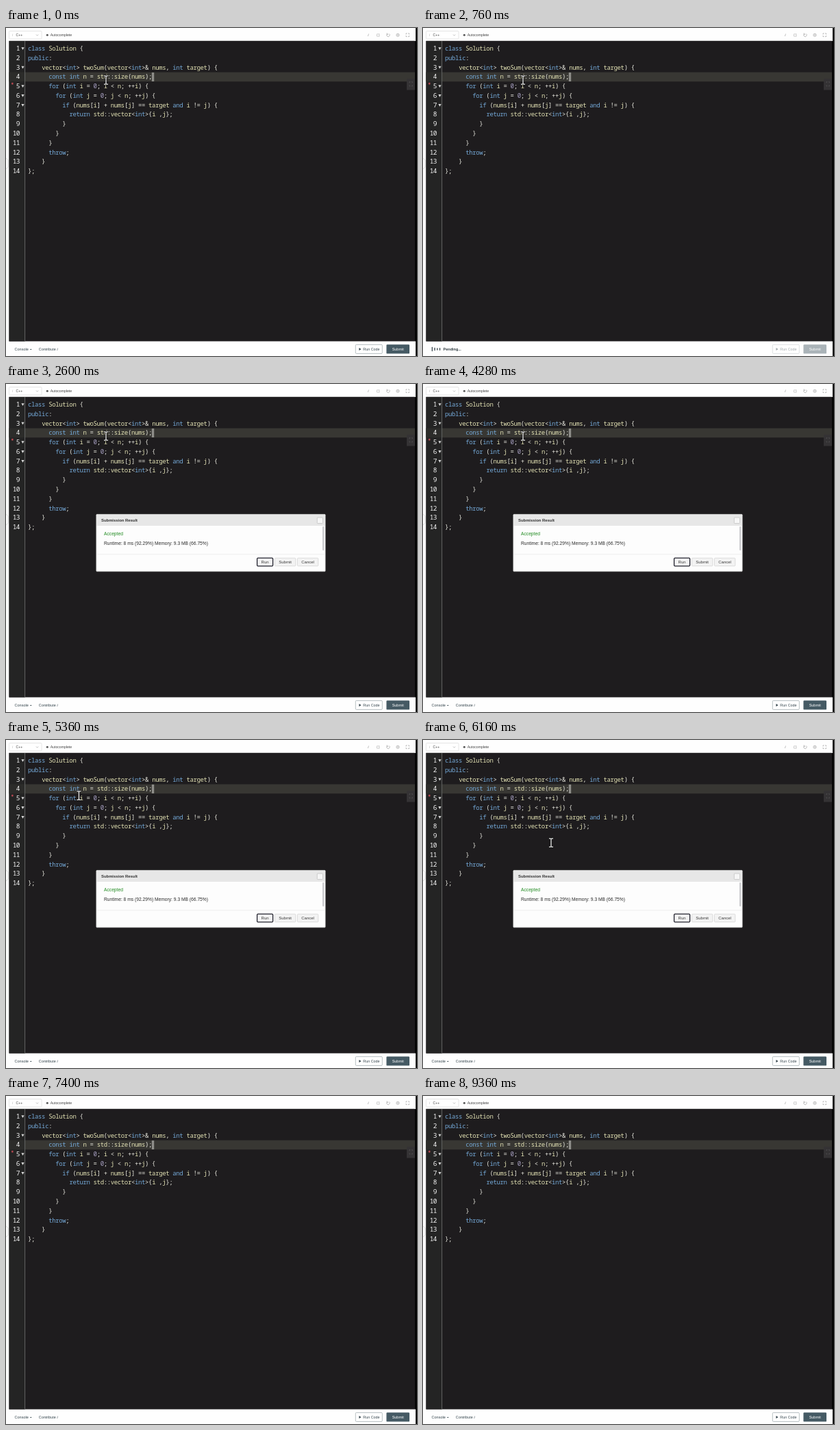
Recreate the animation shown at these times as an HTML page. Size 600 by 479 pixels, loop 9.4 s.

```html
<!DOCTYPE html>
<html lang="en">
<head>
<meta charset="utf-8">
<title>Code editor submission</title>
<style>
  html, body { margin: 0; width: 100%; height: 100%; overflow: hidden; background: #fff; }
  svg { display: block; width: 100vw; height: 100vh; }
  text { font-family: "Liberation Sans", Arial, sans-serif; }
  .code text { font: 9px "Noto Sans Mono", "DejaVu Sans Mono", monospace; letter-spacing: -.37px; white-space: pre; }
  .nums text { font: 500 9.6px "Noto Sans Mono", "DejaVu Sans Mono", monospace; letter-spacing: -.6px; fill: #f4f4f4; text-anchor: end; }
  .mid { text-anchor: middle; }
  .line { fill: none; stroke: #8f8f8f; stroke-width: .6; }
</style>
</head>
<body>
<svg viewBox="0 0 600 479" preserveAspectRatio="none">
  <rect width="600" height="479" fill="#fefefe"/>

  <g id="header">
    <rect x="4.5" y="4.5" width="47.5" height="11.5" rx="1" fill="#fff" stroke="#dcdcdc" stroke-width=".7"/>
    <text x="9" y="12" font-size="5" fill="#aaa" font-style="italic">i</text>
    <text x="14.5" y="12.1" font-size="5.1" fill="#444">C++</text>
    <path d="M44 9.6l1.6 1.6 1.6-1.6" class="line"/>
    <circle cx="60.3" cy="10.3" r="1.5" fill="#555"/>
    <text x="64.7" y="12.1" font-size="5.15" fill="#444">Autocomplete</text>
    <text x="528.3" y="12.4" font-size="6" fill="#888" font-style="italic">i</text>
    <text x="541" y="12.2" font-size="5.6" fill="#888" letter-spacing=".9">{}</text>
    <path class="line" d="M556.4 8.8a2.2 2.2 0 1 0 2.6-.4M556.2 7.4v1.9h1.9"/>
    <circle class="line" cx="572" cy="10.3" r="2.1"/>
    <circle cx="572" cy="10.3" r=".7" fill="#999"/>
    <path class="line" d="M584 9.4v-1.5h1.5M587 7.9h1.5v1.5M588.5 11.1v1.5h-1.5M585.5 12.6h-1.5v-1.5"/>
    <rect x="4.5" y="18.2" width="592.5" height="1" fill="#bdbdbd"/>
  </g>

  <g id="editor">
    <rect x="4.5" y="19" width="592.5" height="438.5" fill="#1e1c1e"/>
    <rect x="4.5" y="19" width="23" height="438.5" fill="#242424"/>
    <rect x="4.5" y="64.6" width="23" height="13.6" fill="#2c2c2a"/>
    <rect x="28" y="64.6" width="569" height="13.6" fill="#383733"/>
    <rect x="27.2" y="19" width=".9" height="438.5" fill="#6c6c6c"/>
    <rect x="597" y="0" width="3" height="479" fill="#050505"/>
    <rect x="597" y="0" width="1" height="19" fill="#fefefe"/>
    <rect x="597" y="457.5" width="1" height="21.5" fill="#fefefe"/>
    <rect x="212.8" y="65" width="3.4" height="13" fill="#8e8d89"/>
    <g class="nums" id="nums"></g>
    <g class="code" id="code"></g>
    <path d="M9.3 79.6v3.2M7.9 80.4l2.8 1.6M10.7 80.4l-2.8 1.6" stroke="#d0505a" stroke-width=".8"/>
    <rect x="585" y="74" width="12" height="16.5" fill="#343234"/>
    <path d="M589 80v-1.3h1.3M592 78.7h1.3v1.3M593.3 83.5v1.3h-1.3M590.3 84.8h-1.3v-1.3" fill="none" stroke="#5b595b" stroke-width=".7"/>
    <path d="M.6 190l2.4 3v10l-2.4 3" fill="#fff" stroke="#c4c4c4" stroke-width=".6"/>
  </g>

  <g id="idleFooter" fill="#37474f">
    <text x="12.4" y="471.2" font-size="5.6">Console</text>
    <path d="M35 470l1.3-1.5 1.3 1.5z"/>
    <text x="47.8" y="471.2" font-size="5.45">Contribute</text>
    <text x="74.6" y="471.2" font-size="5.4" font-style="italic">i</text>
  </g>
  <g id="pendingFooter">
    <g id="bars" fill="#4a565c"></g>
    <text x="29.6" y="471.2" font-size="5.5" font-weight="700" fill="#333f45">Pending...</text>
  </g>
  <g id="actions">
    <rect x="510.3" y="462.4" width="39" height="13" rx="1.2" fill="#fff" stroke="#9aa5aa" stroke-width=".7"/>
    <path d="M515.4 466.9l3.2 2-3.2 2z" fill="#37474f"/>
    <text x="521.3" y="471" font-size="5.4" fill="#37474f">Run Code</text>
    <rect x="555.4" y="462.2" width="33.6" height="13.4" rx="1.2" fill="#455a64"/>
    <text class="mid" x="572.2" y="471" font-size="5.5" fill="#fff">Submit</text>
  </g>

  <g id="dialog">
    <rect x="131.8" y="190.3" width="334.4" height="83.5" rx="1" fill="#fdfdfd" stroke="#c6c6c6" stroke-width=".6"/>
    <rect x="132.2" y="190.7" width="333.6" height="16.3" fill="#e7e7e7"/>
    <text x="139" y="201.2" font-size="5.9" font-weight="700" fill="#333">Submission Result</text>
    <rect x="454.3" y="195" width="8.2" height="8.6" rx=".8" fill="#f6f6f6" stroke="#bdbdbd" stroke-width=".7"/>
    <text x="143" y="221" font-size="6.7" fill="#1f8a1f">Accepted</text>
    <text x="143" y="234.5" font-size="6.69" fill="#2c2c2c">Runtime: 8 ms (92.29%) Memory: 9.3 MB (66.75%)</text>
    <rect x="462" y="208" width="2.3" height="35" rx="1" fill="#c9c9cc"/>
    <rect x="132.2" y="248.6" width="333.6" height=".5" fill="#e2e2e2"/>
    <g id="dialogButtons"></g>
  </g>

  <g id="pointer">
    <path d="M-3-6.2h1.8Q0-6.2 0-5Q0-6.2 1.2-6.2H3M0-5.4V5.4M-3 6.2h1.8Q0 6.2 0 5Q0 6.2 1.2 6.2H3" fill="none" stroke="#111" stroke-width="3"/>
    <path d="M-3-6.2h1.8Q0-6.2 0-5Q0-6.2 1.2-6.2H3M0-5.4V5.4M-3 6.2h1.8Q0 6.2 0 5Q0 6.2 1.2 6.2H3" fill="none" stroke="#f2f2f2" stroke-width="1.3"/>
  </g>
</svg>
<script>
const LOOP = 9400;
const PENDING_START = 120, DIALOG_OPEN = 2320, DIALOG_CLOSE = 6520, POINTER_GONE = 7020;
const LINE_HEIGHT = 13.78, FIRST_BASELINE = 33;

const source = `class Solution {
public:
    vector<int> twoSum(vector<int>& nums, int target) {
      const int n = std::size(nums);
      for (int i = 0; i < n; ++i) {
        for (int j = 0; j < n; ++j) {
          if (nums[i] + nums[j] == target and i != j) {
            return std::vector<int>{i ,j};
          }
        }
      }
      throw;
    }
};`.split("\n");

const $ = id => document.getElementById(id);
const add = (parent, tag, attrs, text) => {
  const el = document.createElementNS("http://www.w3.org/2000/svg", tag);
  for (const name in attrs) el.setAttribute(name, attrs[name]);
  if (text !== undefined) el.textContent = text;
  return parent.appendChild(el);
};

const keyword = /^(class|public|const|int|for|if|and|return|throw)$/;
const tokenColor = token =>
  keyword.test(token) ? "#74a9d8" :
  /^\d/.test(token) ? "#a9a2c4" :
  /^\w/.test(token) ? "#e3e2b4" : "#e9e9e0";

source.forEach((line, i) => {
  const y = FIRST_BASELINE + i * LINE_HEIGHT;
  add($("nums"), "text", { x: 20, y }, i + 1);
  if ([0, 2, 4, 5, 6].includes(i))
    add($("nums"), "path", { d: `M22.4 ${y - 4.8}h4.2l-2.1 3.8z`, fill: "#d8d8d8" });
  const row = add($("code"), "text", { x: 32, y });
  for (const token of line.match(/\w+|\W+/g))
    add(row, "tspan", { fill: tokenColor(token) }, token);
});

[["Run", 366.6, 23], ["Submit", 392.4, 30.4], ["Cancel", 425.4, 30.4]].forEach(([label, x, width], i) => {
  const stroke = i ? "#cfcfcf" : "#20202c";
  add($("dialogButtons"), "rect", { x, y: 254.2, width, height: 11.6, rx: 1.2, fill: "#f3f3f3", stroke, "stroke-width": i ? .7 : 1.3 });
  add($("dialogButtons"), "text", { class: "mid", x: x + width / 2, y: 262.2, "font-size": 6, fill: "#3a3a3a" }, label);
});

const bars = [0, 1, 2, 3].map(i => add($("bars"), "rect", { x: 12.7 + i * 3.7, width: 1.5, rx: .7 }));

// Pointer stops: time, x, y
const stops = [[4800, 146, 76], [5320, 104, 79], [5720, 187, 150], [6530, 187, 150], [7000, 14, 375]];
const ease = p => p * p * (3 - 2 * p);

function pointerAt(t) {
  const next = stops.findIndex(stop => stop[0] > t);
  if (next === 0) return stops[0].slice(1);
  if (next < 0) return stops[stops.length - 1].slice(1);
  const [t0, x0, y0] = stops[next - 1], [t1, x1, y1] = stops[next];
  const p = ease((t - t0) / (t1 - t0));
  return [x0 + (x1 - x0) * p, y0 + (y1 - y0) * p];
}

const show = (id, visible) => $(id).setAttribute("display", visible ? "inline" : "none");

function render(t) {
  const pending = t >= PENDING_START && t < DIALOG_OPEN;
  show("pendingFooter", pending);
  show("idleFooter", !pending);
  $("actions").setAttribute("opacity", pending ? .45 : 1);
  show("dialog", t >= DIALOG_OPEN && t < DIALOG_CLOSE);
  show("pointer", t < POINTER_GONE);
  $("pointer").setAttribute("transform", `translate(${pointerAt(t)})`);
  bars.forEach((bar, i) => {
    const height = 6.2 + 2.6 * Math.cos(2 * Math.PI * (t / 1000 - i * .12));
    bar.setAttribute("height", height);
    bar.setAttribute("y", 469 - height / 2);
  });
}

const start = performance.now();
function tick() {
  render((performance.now() - start) % LOOP);
  requestAnimationFrame(tick);
}
tick();
</script>
</body>
</html>
```
